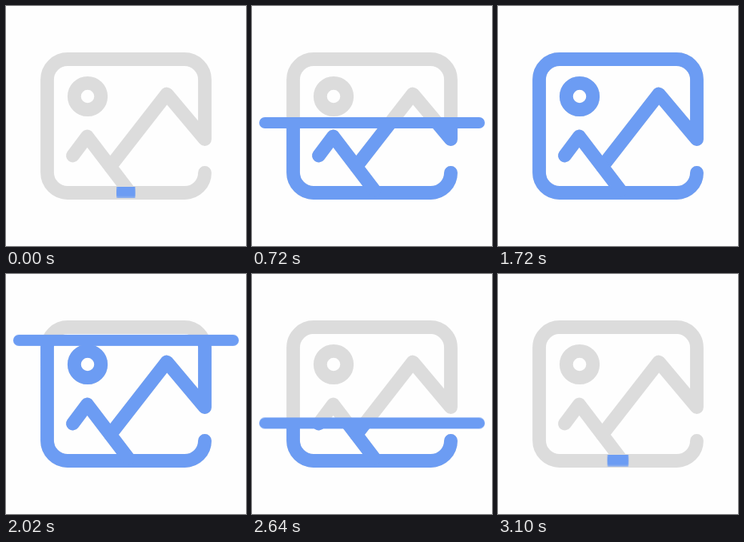
An HTML page for the animation above (3120 ms loop, 300x300 px).

```html
<!DOCTYPE html>
<html lang="en">
<head>
<meta charset="utf-8">
<title>Image scan</title>
<style>
  html, body { margin: 0; width: 100%; height: 100%; overflow: hidden; background: #fefefe; }
  svg { position: absolute; left: 0; top: 0; width: 300px; height: 300px; }
  .icon { fill: none; stroke-width: 16.8; stroke-linecap: round; stroke-linejoin: round; }
  .base { stroke: #dcdcdc; }
  .scanned { stroke: #6c9cf3; animation: reveal 3120ms linear infinite; }
  .bar { fill: #6c9cf3; animation: sweep 3120ms linear infinite; }

  /* grow 200 ms, sweep 1000 ms, shrink 200 ms, rest 320 ms, then back down */
  @keyframes reveal {
    0%, 6.4103% { clip-path: inset(242px 0 0 0); }
    38.4615%, 61.5385% { clip-path: inset(57.5px 0 0 0); }
    93.5897%, 100% { clip-path: inset(242px 0 0 0); }
  }
  @keyframes sweep {
    0% { transform: translate(150px, 233px) scale(0, 1); }
    6.4103% { transform: translate(150px, 233px) scale(1, 1); }
    38.4615% { transform: translate(150px, 66px) scale(1, 1); }
    44.8718%, 55.1282% { transform: translate(150px, 66px) scale(0, 1); }
    61.5385% { transform: translate(150px, 66px) scale(1, 1); }
    93.5897% { transform: translate(150px, 233px) scale(1, 1); }
    100% { transform: translate(150px, 233px) scale(0, 1); }
  }
</style>
</head>
<body>
<svg class="icon base" viewBox="0 0 300 300">
  <g id="picture">
    <path d="M248.5 208.5A25 25 0 0 1 223.5 233.5H77A25.5 25.5 0 0 1 51.5 208V92A25.5 25.5 0 0 1 77 66.5H223A25.5 25.5 0 0 1 248.5 92V166.5L201 110L130.5 200.5"/>
    <path d="M83.5 187L101.5 163L153 230.5"/>
    <circle cx="102" cy="113" r="16.7"/>
  </g>
</svg>
<svg class="icon scanned" viewBox="0 0 300 300"><use href="#picture"/></svg>
<svg viewBox="0 0 300 300"><rect class="bar" x="-141" y="-7" width="282" height="14" rx="7"/></svg>
</body>
</html>
```
